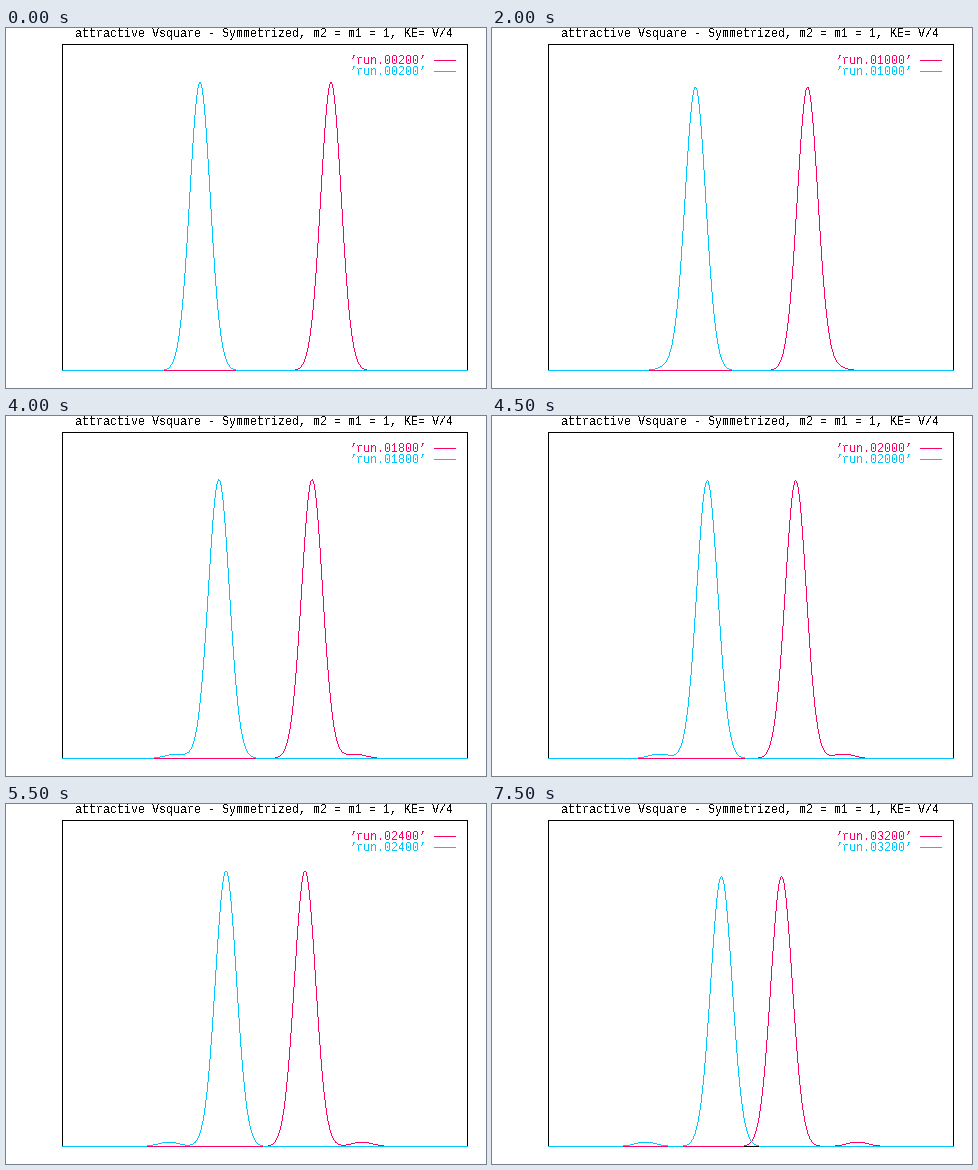
Recreate the animation shown at these times as a matplotlib script. Size 480 by 360 pixels, loop 8 s.

```python
import numpy as np
import matplotlib.pyplot as plt
from matplotlib.animation import FuncAnimation

W, H, DPI = 480, 360, 100
PX = 72 / DPI
FRAMES, INTERVAL = 16, 500
LEFT, RIGHT, TOP, BASE = 56, 461, 16, 342
MID = 259
SPEED = 2.36
PINK, CYAN = "#ff0064", "#00c8ff"

plt.rcParams["font.family"] = "Liberation Mono"
FONT_SIZE = 7 / 0.6 * PX

fig = plt.figure(figsize=(W / DPI, H / DPI), dpi=DPI, facecolor="white")
ax = fig.add_axes([0, 0, 1, 1])
ax.set(xlim=(0, W), ylim=(H, 0))
ax.axis("off")


def line(x, y, color):
    """One-pixel hard-edged line through pixel centres."""
    ax.plot(np.asarray(x) + 0.5, np.asarray(y) + 0.5, color=color,
            lw=PX, antialiased=False, snap=False)


def label(x, y, text, color):
    return ax.text(x, y, text, color=color, size=FONT_SIZE, ha="left",
                   va="baseline", antialiased=False)


def bell(x, center, sigma):
    return np.exp(-((x - center) / sigma) ** 2 / 2)


def density(d, i):
    """Packet seen at distance d outward from the middle, at step i."""
    height = np.interp(i, [0, 2, 6, 10, 15], [288, 285, 281, 276.7, 270])
    main = height * bell(d, 65.5 - SPEED * i, 10.2 + 0.033 * i)
    shed = 4.4 * min(1, i / 3) * bell(d, 70.6 + SPEED * i, 10.6)
    return main + shed


def pixel_runs(side, i):
    """Top and bottom of the vertical run the curve fills in each column."""
    def y(x):
        return BASE - density(side * (x - MID), i)

    a, b, mid = y(xs - 0.5), y(xs + 0.5), np.round(y(xs))
    top = np.minimum(np.ceil(np.minimum(a, b)), mid)
    bottom = np.maximum(np.ceil(np.maximum(a, b)), mid + 1)
    return top, bottom


xs = np.arange(LEFT, RIGHT + 1)
edges = np.arange(LEFT, RIGHT + 2)
line([LEFT, RIGHT, RIGHT, LEFT, LEFT], [TOP, TOP, BASE, BASE, TOP], "black")
label(69, 9, "attractive Vsquare - Symmetrized, m2 = m1 = 1, KE= V/4", "black")

packets = []
for side, color, row in ((1, PINK, 32), (-1, CYAN, 43)):
    line([428, 449], [row, row], color)
    top, bottom = pixel_runs(side, 0)
    curve = ax.stairs(top, edges, baseline=bottom, fill=True, color=color,
                      lw=0, antialiased=False, snap=False, zorder=3)
    packets.append((side, curve, label(344, row + 4, "", color)))
ax.set(xlim=(0, W), ylim=(H, 0))


def update(i):
    artists = []
    for side, curve, name in packets:
        top, bottom = pixel_runs(side, i)
        curve.set_data(top, edges, bottom)
        name.set_text(f"’run.{200 * (i + 1):05d}’")
        artists += [curve, name]
    return artists


anim = FuncAnimation(fig, update, frames=FRAMES, interval=INTERVAL,
                     repeat=True, repeat_delay=0)
plt.show()
```
